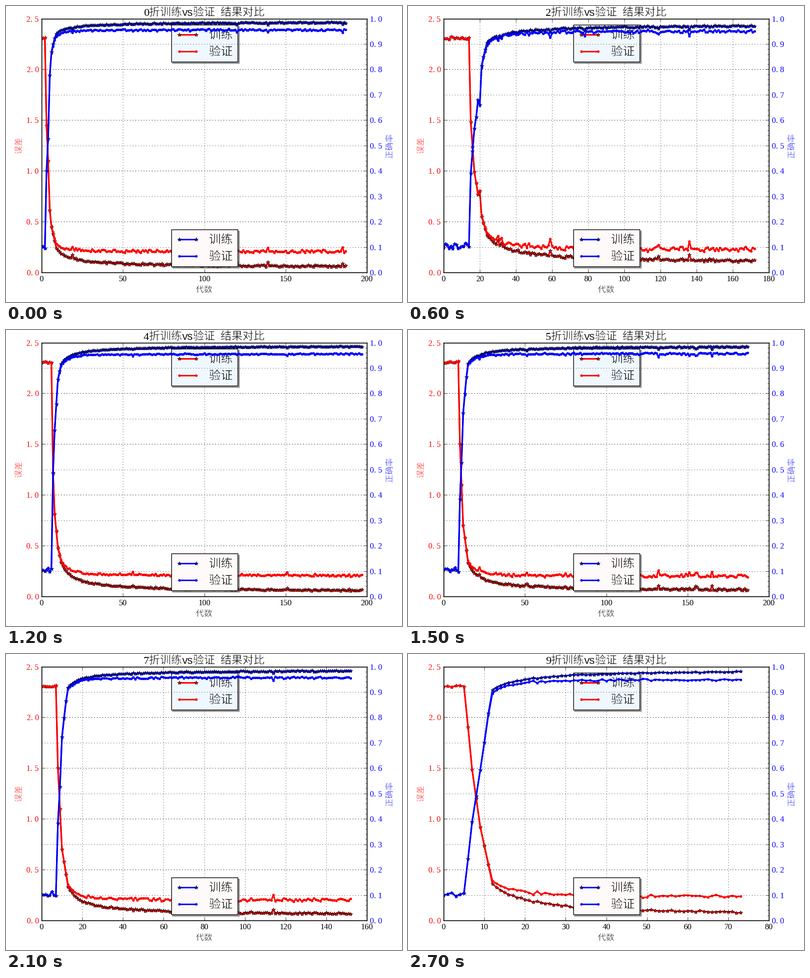
A matplotlib script for the animation above (3 s loop, 800x600 px).

```python
import numpy as np
import matplotlib.pyplot as plt
from matplotlib.animation import FuncAnimation
from matplotlib.patches import Rectangle
from matplotlib.patheffects import Stroke
from matplotlib.ticker import FuncFormatter, MultipleLocator

W, H, DPI = 800, 600, 100
RED, BLUE = "#ff0000", "#0000ff"
CJK = "Noto Sans CJK JP"
plt.rcParams["font.family"] = "Liberation Serif"
plt.rcParams["font.size"] = 12
plt.rcParams["lines.scale_dashes"] = False

START_LOSS, START_ACC = 2.307, 0.103


def accuracy(loss):
    """Typical accuracy reached at a given loss."""
    return np.interp(loss, [0, 0.08, 0.25, 0.35, 0.5, 0.9, 1.48, START_LOSS],
                     [1, 0.98, 0.938, 0.912, 0.845, 0.6, 0.39, START_ACC])


def train_fold(seed, last, flat, drop, end, floor, rough=1):
    """Return epochs, train/validation loss and train/validation accuracy.

    The loss waits for flat epochs, falls through the drop points
    {epochs after the wait: loss}, then decays as a power law towards end.
    Validation loss follows it down to floor.
    """
    rng = np.random.default_rng(seed)
    epochs = np.arange(last + 1)
    after = epochs - flat
    knee, knee_loss = list(drop.items())[-1]
    fall = np.interp(after, [0, *drop], [START_LOSS, *drop.values()])
    decay = end + (knee_loss - end) * (np.maximum(after, knee) / knee) ** -0.85
    loss = np.where(after > knee, decay, fall)
    val_loss = np.cbrt(loss**3 + floor**3)

    settled = np.clip((after - knee) / 8, 0, 1)
    waiting = after <= 0
    a, b = rough * np.clip(rng.normal(size=(2, last + 1)), -1.7, 1.7)
    spikes = (rng.random(last + 1) < 0.025) * rng.uniform(0.02, 0.05, last + 1)
    spikes *= rough * settled
    loss += 0.006 * a * (settled + waiting) + 0.8 * spikes
    val_loss += 0.006 * a * waiting + (0.004 * a + 0.008 * b) * settled + spikes

    acc = accuracy(loss) + 0.005 * b * waiting
    val_acc = accuracy(val_loss) + 0.006 * b * waiting + 0.007 * settled
    return epochs, (loss, val_loss, acc, val_acc)


TYPICAL = {1: 1.5, 3: 0.7, 6: 0.33}
FOLDS = [
    dict(last=187, flat=2, drop={1: 1.45, 2: 1.10, 3: 0.61, 4: 0.447, 7: 0.24}, end=0.05, floor=0.205),
    dict(last=172, flat=3, drop=TYPICAL, end=0.05, floor=0.2),
    dict(last=172, flat=14, drop={1: 1.48, 3: 0.99, 5: 0.77, 6: 0.80, 7: 0.55, 10: 0.365},
         end=0.09, floor=0.22, rough=1.4),
    dict(last=177, flat=1, drop={1: 2.10, 2: 1.13, 4: 0.72, 5: 0.38, 6: 0.30}, end=0.05, floor=0.198),
    dict(last=197, flat=6, drop={1: 1.22, 2: 0.81, 4: 0.475, 6: 0.335}, end=0.045, floor=0.207, rough=0.7),
    dict(last=187, flat=9, drop=TYPICAL, end=0.05, floor=0.2),
    dict(last=73, flat=17, drop={1: 1.48, 2: 1.055, 3: 0.52, 4: 0.35}, end=0.065, floor=0.21),
    dict(last=152, flat=7, drop=TYPICAL, end=0.05, floor=0.2),
    dict(last=170, flat=16, drop={1: 1.99, 2: 1.27, 3: 0.915, 5: 0.53, 6: 0.375, 8: 0.30},
         end=0.05, floor=0.215),
    dict(last=73, flat=5, drop={1: 1.905, 2: 1.485, 4: 0.92, 7: 0.36}, end=0.035, floor=0.235),
]
results = [train_fold(seed, **fold) for seed, fold in enumerate(FOLDS)]

fig = plt.figure(figsize=(W / DPI, H / DPI), dpi=DPI, facecolor="white")
ax_loss = fig.add_axes([72 / W, 60 / H, 657 / W, 514.5 / H])
ax_acc = ax_loss.twinx()


def pixel_layer(zorder):
    layer = fig.add_axes([0, 0, 1, 1], zorder=zorder)
    layer.set(xlim=(0, W), ylim=(H, 0))
    layer.axis("off")
    return layer


back = pixel_layer(1)
ax_acc.set_zorder(2)
front = pixel_layer(3)


def thin_text(layer, x, y, text, paper="white", **style):
    """Chinese text with its strokes thinned by an outline in the paper colour."""
    return layer.text(x, y, text, family=CJK, va="baseline",
                      path_effects=[Stroke(linewidth=0.4, foreground=paper)], **style)


STAR = dict(marker="*", ms=6, mec="black", mew=0.5, lw=2.2)
DOT = dict(marker="o", ms=3.2, mew=0.5, lw=2.2)


def legend(layer, top, color, face, shade):
    layer.add_patch(Rectangle((336, top + 3), 134.5, 75.5, fc=shade, ec=shade, alpha=0.5, lw=1))
    layer.add_patch(Rectangle((333.5, top), 134, 75.5, fc=face, ec="black", lw=1))
    for dy, label, style in ((20, "训练", STAR), (54, "验证", DOT)):
        layer.plot([350, 383.5], [top + dy] * 2, color=color, **style)
        thin_text(layer, 410, top + dy + 8.5, label, face, fontsize=17.28)


legend(back, 37.5, RED, "aliceblue", "#484a4d")
legend(front, 452.5, BLUE, "snow", "#4d4b4b")

# The title sits on a monospaced grid: Latin characters take half an em.
TITLE_SIZE = 16
em = TITLE_SIZE * DPI / 72
pen = 400 - 5.5 * em
fold_digit = front.text(pen, 19.5, "", fontsize=TITLE_SIZE, va="baseline")
pen += em / 2
for part in ("折训练", "VS", "验证", " ", "结果对比"):
    if part.isascii():
        front.text(pen, 19.5, part, family="Liberation Mono",
                   fontsize=TITLE_SIZE / 1.2, va="baseline")
        pen += len(part) * em / 2
    else:
        thin_text(front, pen, 19.5, part, fontsize=TITLE_SIZE)
        pen += len(part) * em

thin_text(front, 400, 580, "代数", ha="center")
for x, y, label, color in ((31, 284, "误差", RED), (780, 285, "正确率", BLUE)):
    thin_text(front, x, y, label, color=color, rotation=90, rotation_mode="anchor", ha="center")

# A blank after the point keeps the digits on half-width cells.
decimal = FuncFormatter(lambda v, _: f"{v:.1f}".replace(".", ". "))
GRID = dict(color="black", lw=0.5, ls=(0, (1, 3)))
TICKS = dict(direction="in", length=4, width=0.5, pad=4)
for ax, top, step, color in ((ax_loss, 2.5, 0.5, RED), (ax_acc, 1, 0.1, BLUE)):
    ax.set_ylim(0, top)
    ax.set_axisbelow(False)
    ax.yaxis.set_major_locator(MultipleLocator(step))
    ax.yaxis.set_major_formatter(decimal)
    ax.tick_params(axis="y", labelcolor=color, **TICKS)
    ax.grid(True, axis="y", **GRID)
    for spine in ax.spines.values():
        spine.set_linewidth(1)
ax_loss.tick_params(axis="x", top=True, **TICKS)
ax_loss.grid(True, axis="x", **GRID)
ax_acc.yaxis.set_minor_locator(MultipleLocator(0.02))
ax_acc.tick_params(axis="y", which="minor", direction="in", length=2, width=0.5)

lines = [ax.plot([], [], color=color, **style)[0]
         for ax, color in ((ax_loss, RED), (ax_acc, BLUE))
         for style in (STAR, DOT)]


def update(index):
    epochs, curves = results[index]
    for line, curve in zip(lines, curves):
        line.set_data(epochs, curve)
    last = epochs[-1]
    step = 10 if last < 100 else 20 if last < 180 else 50
    xmax = int(np.ceil(last / step)) * step
    ax_loss.set_xlim(0, xmax)
    ax_loss.set_xticks(range(0, xmax + 1, step))
    fold_digit.set_text(str(index))
    return [*lines, fold_digit]


anim = FuncAnimation(fig, update, frames=len(results), interval=300, repeat=True,
                     repeat_delay=0, blit=False)
plt.show()
```
